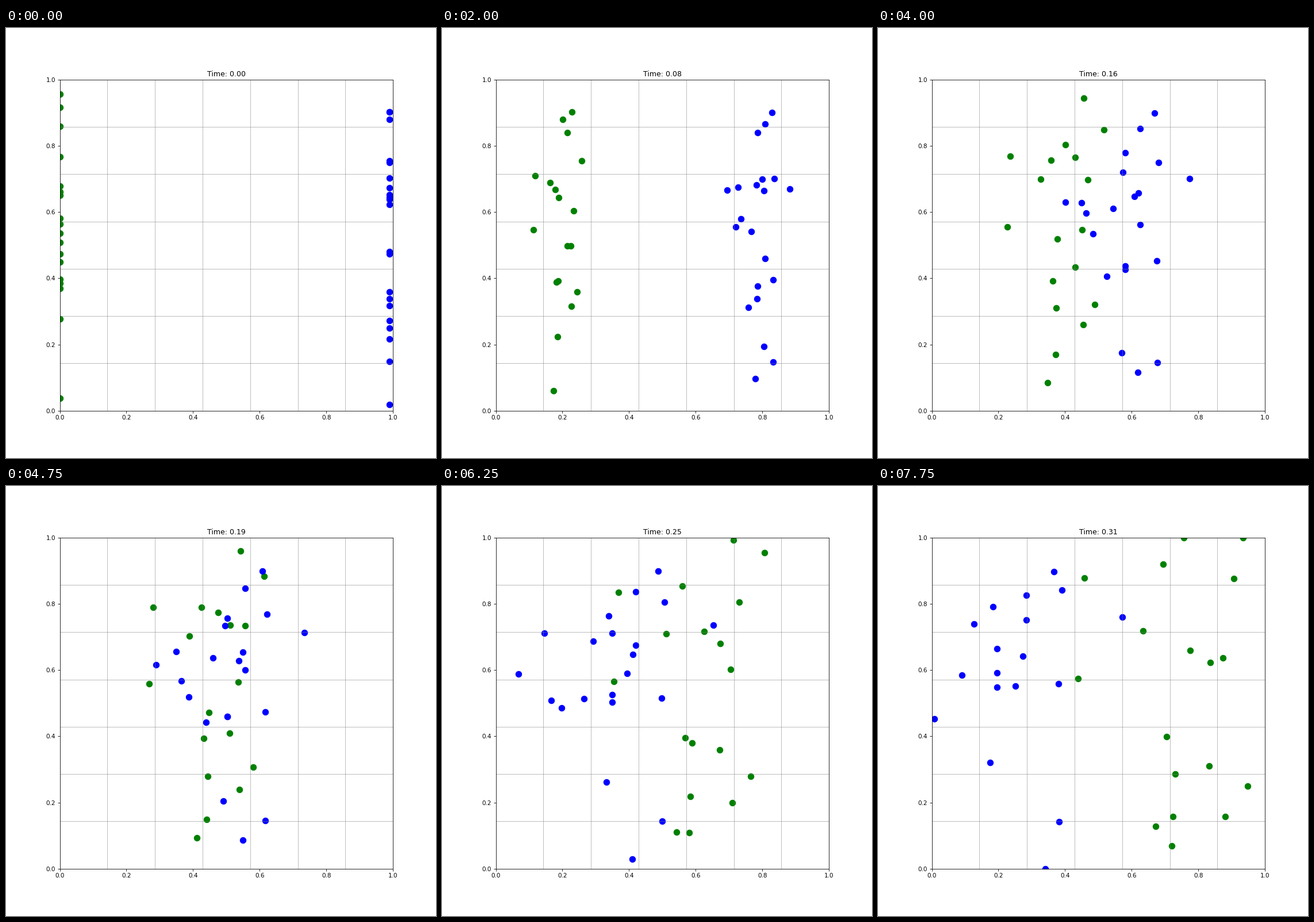
These frames come from a looping animation (748x748 px, 8000 ms). A matplotlib script:

```python
import numpy as np
import matplotlib.pyplot as plt
from matplotlib.animation import FuncAnimation

SIZE = 748
FRAMES = 32
CELLS = 7

# Per dot, in stage pixels: start y, then x and y of its free path at the last frame.
GREEN = [
    (171, 606.5, 76), (115, 543, 285.5), (138, 577.5, 307), (285, 673.5, 76),
    (290.5, 358.5, 160), (275, 461, 252.3), (331, 496, 136), (224, 517, 500.7),
    (373, 619, 161), (356.5, 348, 335.5), (341, 576.3, 487), (407, 600, 298.5),
    (393, 513, 575.3), (444, 502, 436), (437, 643, 521.7), (453, 604, 574.7),
    (506, 511, 626), (644, 483, 592),
]
BLUE = [
    (146, 305.5, 149), (159, 258, 190), (146.3, 207, 282.8), (234, 239, 347.5),
    (290, 319.5, 181), (294.5, 199.5, 210), (231, 75.5, 407.7), (261, 5, 342.5),
    (278, 251.5, 296), (298, 425, 228), (307, 98, 405), (389, 60.7, 223.7),
    (393, 166.5, 240), (459, 258, 233), (471, 314, 344), (483, 206.8, 349.7),
    (522, 206.5, 325), (541, 145.7, 329), (509, 250, 683), (580, 315, 584),
    (655, 195, 481),
]

fig, ax = plt.subplots(figsize=(10, 10), dpi=SIZE / 10)
ax.set_xlim(0, 1)
ax.set_ylim(0, 1)
title = ax.set_title("Time: 0.00")
for k in range(1, CELLS):
    ax.axvline(k / CELLS, color="gray", lw=0.5)
    ax.axhline(k / CELLS, color="gray", lw=0.5)

box = ax.get_position()


def to_data(x, y):
    """Stage pixels (y down) to axes units."""
    return (x / SIZE - box.x0) / box.width, (1 - y / SIZE - box.y0) / box.height


class Swarm:
    """Dots in straight flight that stick to the top and bottom walls."""

    def __init__(self, rows, x0, color):
        start, end_x, end_y = np.array(rows, float).T
        _, self.y0 = to_data(0, start)
        x1, y1 = to_data(end_x, end_y)
        self.x0 = x0
        self.vx = (x1 - x0) / (FRAMES - 1)
        self.vy = (y1 - self.y0) / (FRAMES - 1)
        wall = np.where(self.vy > 0, 1.0, 0.0)
        self.stop = (wall - self.y0) / self.vy
        self.dots, = ax.plot([], [], "o", color=color, ms=10, zorder=1)

    def move(self, n):
        t = np.minimum(n, self.stop)
        self.dots.set_data(self.x0 + self.vx * t, self.y0 + self.vy * t)


swarms = [Swarm(GREEN, 0.0, "green"), Swarm(BLUE, 0.99, "blue")]


def update(n):
    for swarm in swarms:
        swarm.move(n)
    title.set_text(f"Time: {n / 100:.2f}")
    return [title] + [s.dots for s in swarms]


anim = FuncAnimation(fig, update, frames=FRAMES, interval=250,
                     repeat=True, repeat_delay=0, blit=False)
plt.show()
```
